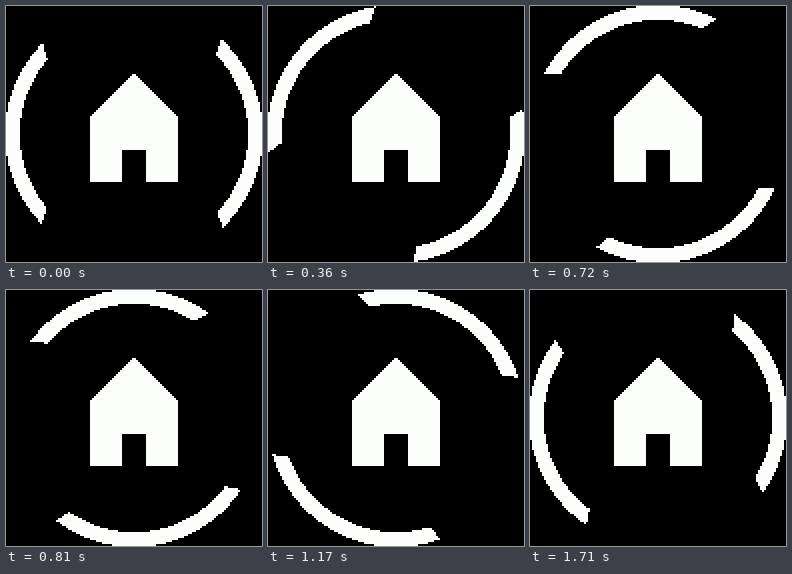
An HTML page with a canvas that plays this animation: 256 px wide and 256 px high, repeating every 1.8 s.

```html
<!DOCTYPE html>
<html lang="en">
<head>
<meta charset="utf-8">
<title>Home loader</title>
<style>
html, body { margin: 0; width: 100%; height: 100%; overflow: hidden; background: #000; }
canvas { display: block; width: 100vw; height: 100vh; image-rendering: pixelated; }
</style>
</head>
<body>
<canvas id="stage" width="256" height="256"></canvas>
<script>
const ctx = document.getElementById('stage').getContext('2d');
const SIZE = 256, MID = SIZE / 2, CELL = 2;
const STEP = 90, STEPS = 20;
const OUTER = 128.9, INNER = 114;
const DEG = Math.PI / 180;
const WHITE = '#fcfefc', BLACK = '#000';

// Degrees from the horizontal to each end on the outer edge;
// the slant is how much shorter the inner edge is.
const LEFT = { top: 45, bottom: 44.5, slant: 4.2 };
const RIGHT = { top: 47.3, bottom: 46.5, slant: 3.1 };

function inArc(x, y) {
  const r = Math.hypot(x, y);
  if (r < INNER || r > OUTER) return false;
  const arc = x < 0 ? LEFT : RIGHT;
  const end = y < 0 ? arc.top : arc.bottom;
  const depth = (OUTER - r) / (OUTER - INNER);
  const angle = Math.atan2(Math.abs(y), Math.abs(x)) / DEG;
  return angle <= end - arc.slant * depth;
}

function drawRing(turn) {
  const c = Math.cos(turn), s = Math.sin(turn);
  for (let py = 0; py < SIZE; py += CELL) {
    for (let px = 0; px < SIZE; px += CELL) {
      const x = px + CELL / 2 - MID, y = py + CELL / 2 - MID;
      if (inArc(x * c + y * s, y * c - x * s)) ctx.fillRect(px, py, CELL, CELL);
    }
  }
}

function drawHouse() {
  for (let y = 68; y < 176; y += CELL) {
    const half = Math.min(44, y - 66);
    ctx.fillRect(MID - half, y, half * 2, CELL);
  }
  ctx.fillStyle = BLACK;
  ctx.fillRect(116, 144, 24, 32);
}

function draw(step) {
  ctx.fillStyle = BLACK;
  ctx.fillRect(0, 0, SIZE, SIZE);
  ctx.fillStyle = WHITE;
  drawRing(step * 180 / STEPS * DEG);
  drawHouse();
}

const start = performance.now();
function tick() {
  draw(Math.floor((performance.now() - start) / STEP) % STEPS);
  requestAnimationFrame(tick);
}
tick();
</script>
</body>
</html>
```
